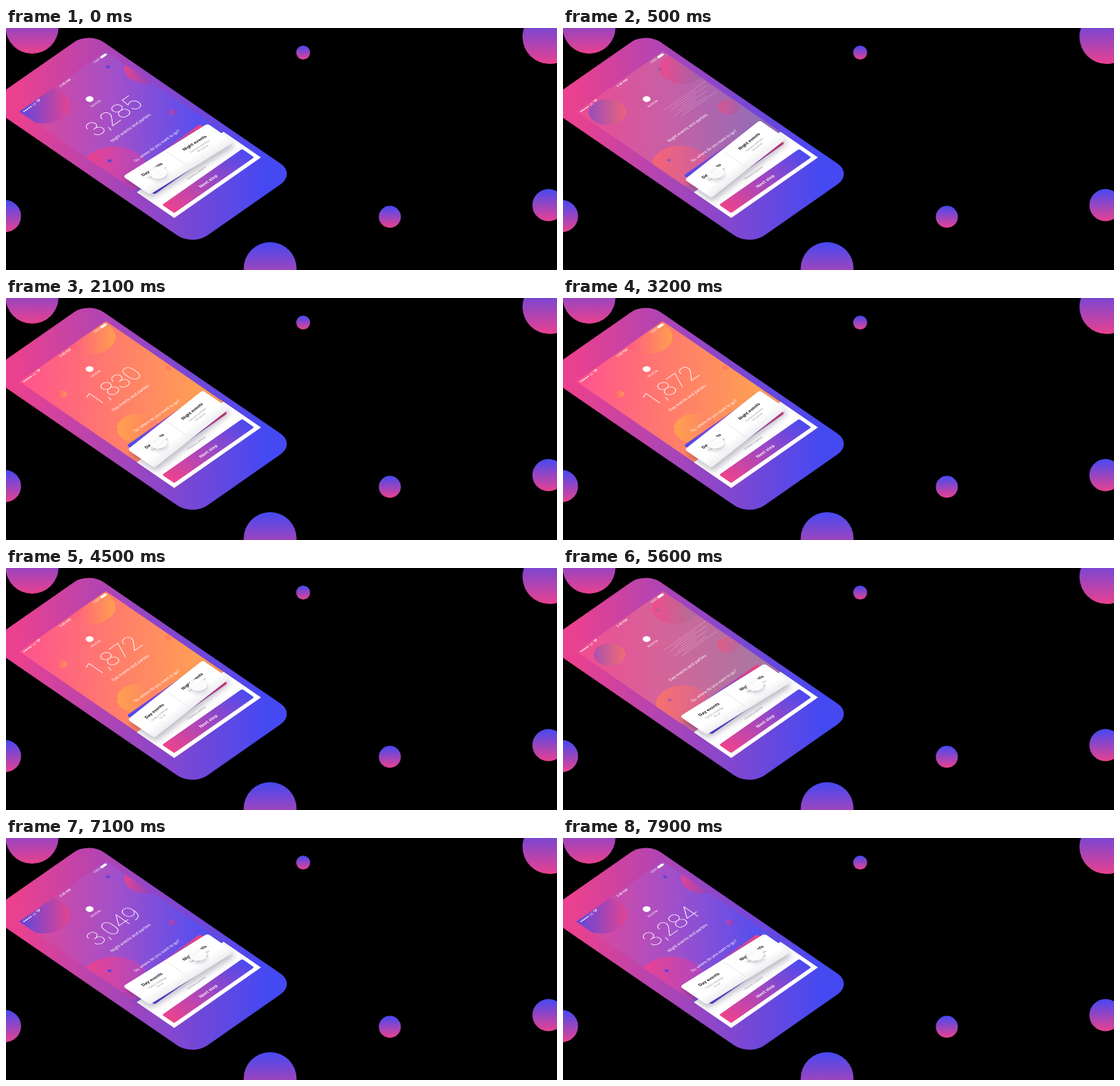
Recreate the animation shown at these times as an HTML page with a canvas. Size 750x330 px, loop 8 s.

```html
<!DOCTYPE html>
<html lang="en">
<head>
<meta charset="utf-8">
<title>Event app on a tilted phone</title>
<style>
html, body { margin: 0; width: 100%; height: 100%; overflow: hidden; background: #000; }
canvas { display: block; }
</style>
</head>
<body>
<canvas id="stage" width="750" height="330"></canvas>
<script>
const ctx = document.getElementById('stage').getContext('2d');
const LOOP = 8000, DAY_START = 0, NIGHT_START = 5000;
const PINK = '#e9418f', BLUE = '#4549f2';
const W = 375, H = 667;
const SANS = 'Roboto, sans-serif', BOLD = 'Inter, sans-serif';
const TILT = [.115 / 2, -.06];               // night, day

// Stage position and horizontal radius: [x, y, rx, left colour, right colour]
const BLOBS = [
  { night: [51, 105, 36, [88, 70, 224], [226, 68, 146]], day: [76, 131, 7, [255, 92, 122], [255, 150, 84]] },
  { night: [191, 55, 30, [226, 68, 146], [88, 70, 224]], day: [115, 53, 34, [255, 84, 136], [255, 158, 80]] },
  { night: [228, 115, 6, [192, 66, 170], [110, 70, 220]], day: [222, 95, 5, [255, 120, 100], [255, 140, 90]], swell: 10 },
  { night: [148, 194, 46, [240, 66, 140], [170, 72, 196]], day: [180, 178, 29, [255, 160, 78], [255, 128, 104]] },
  { night: [139, 53, 2.8, [90, 70, 216], [90, 70, 216]], day: [119, 62, 2.2, [255, 104, 104], [255, 140, 90]] },
  { night: [141, 181, 2.8, [90, 70, 216], [90, 70, 216]], day: [150, 179, 2.6, [255, 104, 104], [255, 140, 90]] }
];

// Ambient circles: [x, y, r]
const CIRCLES = [[35.5, -1, 36], [404.5, 33.5, 9.5], [740, 12, 37], [-1.5, 256.5, 22],
  [359.5, 328, 36], [522.5, 257.5, 15], [738.5, 241.5, 22]];

const clamp = v => Math.max(0, Math.min(1, v));
const span = (t, from, length) => clamp((t - from) / length);
const mix = (a, b, k) => a + (b - a) * k;
const smooth = p => .5 - .5 * Math.cos(Math.PI * p);
const outCubic = p => 1 - (1 - p) ** 3;
const rgb = (a, b, k) => `rgb(${a.map((v, i) => Math.round(mix(v, b[i], k)))})`;

function gradient(x0, y0, x1, y1, ...colors) {
  const g = ctx.createLinearGradient(x0, y0, x1, y1);
  colors.forEach((c, i) => g.addColorStop(i / (colors.length - 1), c));
  return g;
}

function box(x, y, w, h, r, fill) {
  ctx.beginPath();
  ctx.roundRect(x, y, w, h, r);
  ctx.fillStyle = fill;
  ctx.fill();
}

function disc(x, y, rx, ry, fill) {
  ctx.beginPath();
  ctx.ellipse(x, y, rx, ry, 0, 0, 7);
  ctx.fillStyle = fill;
  ctx.fill();
}

function label(text, x, y, font, fill = '#fff') {
  ctx.font = font;
  ctx.textAlign = 'center';
  ctx.fillStyle = fill;
  ctx.fillText(text, x, y);
}

function shadow(color, blur, x, y) {
  ctx.shadowColor = color;
  ctx.shadowBlur = blur;
  ctx.shadowOffsetX = x;
  ctx.shadowOffsetY = y;
}

// Screen units to the tilted plane
const tilt = () => ctx.setTransform(.3147, -.22, .3163, .2174, 18, 114);

function background(day) {
  ctx.save();
  ctx.beginPath();
  ctx.rect(0, 0, W, H);
  ctx.clip();
  ctx.fillStyle = gradient(20, 20, 385, 385,
    rgb([222, 72, 154], [255, 86, 140], day),
    rgb([164, 80, 200], [255, 124, 108], day),
    rgb([88, 78, 238], [255, 158, 84], day));
  ctx.fillRect(0, 0, W, H);
  ctx.resetTransform();
  for (const { night: n, day: d, swell = 0 } of BLOBS) {
    const x = mix(n[0], d[0], day), y = mix(n[1], d[1], day);
    const r = mix(n[2], d[2], day) + swell * 4 * day * (1 - day);
    disc(x, y, r, r * .7, gradient(x - r, y, x + r, y, rgb(n[3], d[3], day), rgb(n[4], d[4], day)));
  }
  ctx.restore();
}

function statusBar() {
  for (let i = 0; i < 5; i++) disc(11 + i * 7.2, 10, 2.7, 2.7, '#fff');
  label('LK', 55, 14, '12px ' + SANS);
  ctx.strokeStyle = '#fff';
  ctx.lineWidth = 2;
  for (const r of [2, 6, 10]) {
    ctx.beginPath();
    ctx.arc(75, 14, r, -2.35, -.8);
    ctx.stroke();
  }
  label('3:40 AM', 188, 14, '500 12px ' + SANS);
  label('100%', 326, 14, '12px ' + SANS);
  box(343, 5, 23, 9, 2, '#fff');
  box(367, 8, 2, 4, 1, '#fff');
}

function counter(value, scale, alpha) {
  ctx.save();
  ctx.globalAlpha = alpha;
  ctx.translate(188, 218);
  ctx.scale(scale, scale);
  label(Math.round(value).toLocaleString('en-US'), 0, 30, '100 86px ' + SANS);
  ctx.restore();
}

function streaks(k) {
  ctx.strokeStyle = `rgba(255,255,255,${.4 * Math.sin(Math.PI * k)})`;
  ctx.lineWidth = 1.6;
  for (let i = 0; i < 8; i++) {
    ctx.beginPath();
    ctx.moveTo(190 + i * 37 % 60, 186 + i * 8);
    ctx.lineTo(375 - i * 53 % 90, 186 + i * 8);
    ctx.stroke();
  }
}

function numbers(t) {
  const toNight = t >= NIGHT_START;
  const start = toNight ? NIGHT_START : DAY_START;
  const [oldTotal, total] = toNight ? [1872, 3285] : [3285, 1872];
  const f = outCubic(toNight ? span(t, 5763, 2290) : span(t, 190, 2660));
  const gone = span(t, start + 100, 330);
  const streak = span(t, start + 300, 560);
  if (gone < 1) counter(oldTotal, 1 - .3 * gone, 1 - gone);
  if (streak > 0 && streak < 1) streaks(streak);
  if (f > .3) counter(total * f, .5 + .5 * f, clamp((f - .3) * 2.6));
}

function card(lean) {
  box(31, 432, 317, 119, 8, gradient(31, 0, 348, 0, '#4f49ec', '#8a49cf', '#ee437f'));
  ctx.save();
  ctx.transform(1, lean, 0, 1, 0, -lean * 192);
  shadow('rgba(20,10,50,.28)', 9, 2, 5);
  box(20, 436, 346, 115, 10, gradient(0, 436, 0, 551, '#fff', '#fff', '#fff', '#eeeef1'));
  shadow('transparent', 0, 0, 0);
  ctx.fillStyle = '#e6e6ea';
  ctx.fillRect(190, 446, 2, 92);
  const title = '700 15px ' + BOLD, note = '9.5px ' + SANS;
  label('Day events', 104, 478, title, '#16161c');
  label("Today's meetings", 104, 498, note, '#8d8d94');
  label('for all', 104, 511, note, '#8d8d94');
  label('Night events', 278, 478, title, '#16161c');
  label('Concerts and bars', 278, 498, note, '#8d8d94');
  label('till sunrise', 278, 511, note, '#8d8d94');
  ctx.restore();
}

function pointer(t) {
  const x = mix(107, 279, smooth(span(t, 3750, 650)));
  const press = Math.sin(Math.PI * span(t, t < 2000 ? DAY_START : NIGHT_START - 150, 300));
  const r = 27 * (1 - .12 * press);
  shadow('rgba(30,20,60,.22)', 5, 1, 3);
  disc(x, 491, r, r, 'rgba(255,255,255,.93)');
  shadow('transparent', 0, 0, 0);
}

function draw(t) {
  const toNight = t >= NIGHT_START;
  const since = t - (toNight ? NIGHT_START : DAY_START);
  const blend = k => toNight ? 1 - k : k;
  const day = blend(smooth(clamp(since / 1200)));
  const cardDay = blend(smooth(clamp((since - 50) / 450)));
  const nameDay = blend(clamp((since - 620) / 180));

  ctx.resetTransform();
  ctx.fillStyle = '#000';
  ctx.fillRect(0, 0, 750, 330);
  for (const [x, y, r] of CIRCLES) disc(x, y, r, r, gradient(0, y - r, 0, y + r, BLUE, PINK));

  tilt();
  box(-48, -97, 446, 890, 64, gradient(0, 0, 530, 530, PINK, '#9746c3', BLUE));
  background(day);
  statusBar();
  disc(190, 114, 12, 12, '#fff');
  label('NUVESK', 189, 145, '11px ' + SANS);
  numbers(t);

  const line = '15.5px ' + SANS;
  ctx.globalAlpha = nameDay;
  label('Day events and parties', 188, 297, line);
  ctx.globalAlpha = 1 - nameDay;
  label('Night events and parties', 188, 297, line);
  ctx.globalAlpha = 1;
  label('So, where do you want to go?', 188, 410, '15px ' + SANS);

  ctx.fillStyle = '#fff';
  ctx.fillRect(0, 506, W, 161);
  label('Choose a section', 188, 579, '10px ' + SANS, '#8d8d94');
  box(15, 600, 346, 52, 5, gradient(15, 0, 361, 0, '#ee438c', '#a047c0', '#4a4af0'));
  label('Next step', 188, 632, '600 16px ' + BOLD);
  card(mix(TILT[0], TILT[1], cardDay));
  pointer(t);
}

const begin = performance.now();
function tick() {
  draw((performance.now() - begin) % LOOP);
  requestAnimationFrame(tick);
}
tick();
</script>
</body>
</html>
```
